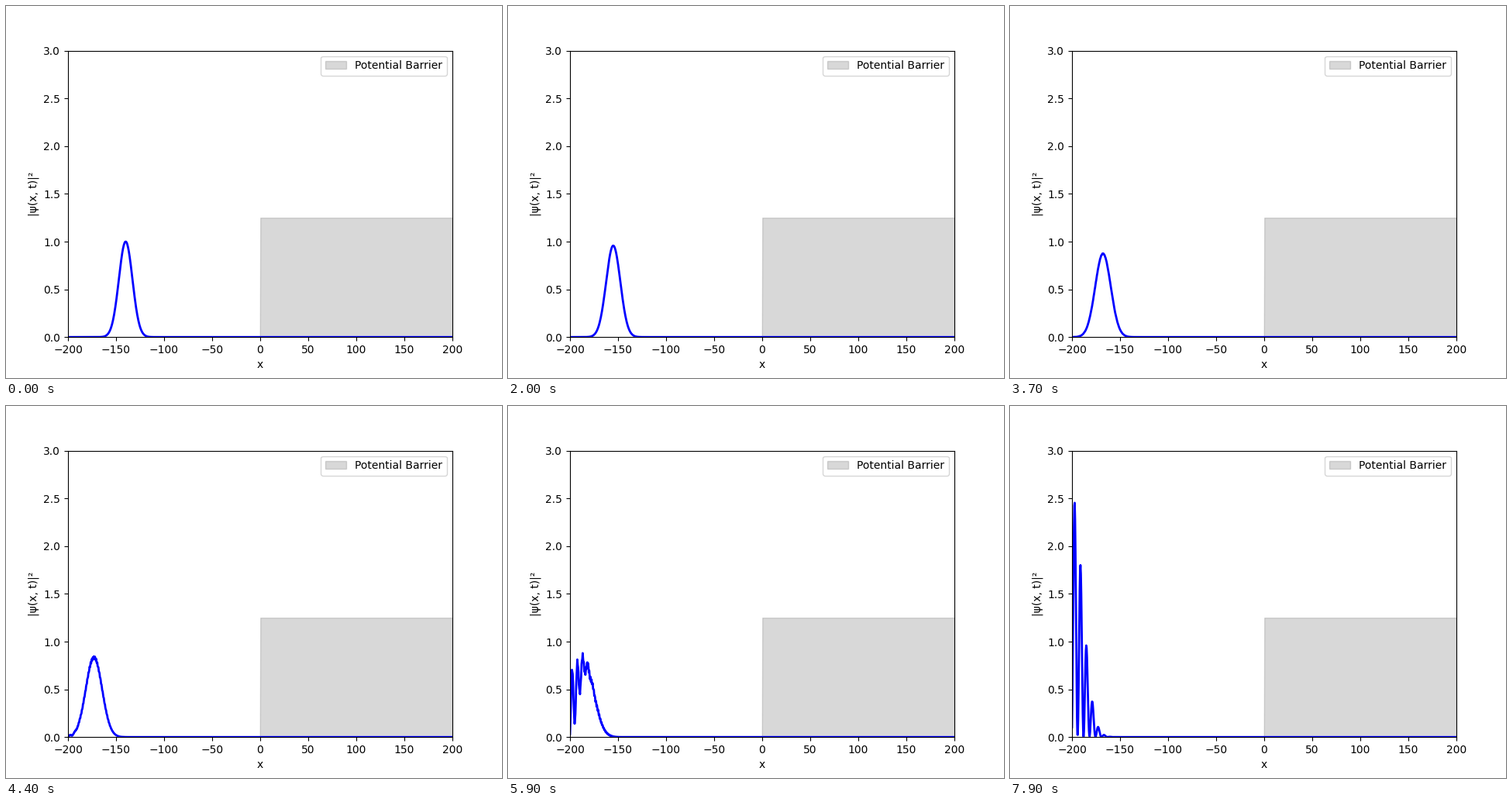
These frames come from a looping animation (640x480 px, 8000 ms). A matplotlib script:

```python
import numpy as np
import matplotlib.pyplot as plt
from matplotlib.animation import FuncAnimation

FRAMES, INTERVAL = 80, 100
DT = 1.5            # time units per frame
SIGMA, K = 10.0, 0.5
START, WALL = -140.0, -200.4
BARRIER = 1.25

x = np.linspace(-200, 200, 1000)
dist = x - WALL


def packet(d, t):
    """Spreading Gaussian packet that travels towards the wall."""
    spread = 1 + 1j * t / SIGMA**2
    u = d - (START - WALL - K * t)
    return np.exp(-u**2 / (2 * SIGMA**2 * spread) - 1j * K * d) / np.sqrt(spread)


def ripple(n):
    """Faint short-wave scatter while the packet meets the wall."""
    amp = 0.02 * np.exp(-((n - 54) / 11) ** 2)
    return amp * np.exp(-(dist / 55) ** 4 + 5j * dist)


def density(n):
    t = n * DT
    psi = packet(dist, t) - packet(-dist, t) + ripple(n)
    return np.abs(psi) ** 2


fig, ax = plt.subplots(figsize=(6.4, 4.8), dpi=100)
ax.set_xlim(-200, 200)
ax.set_ylim(0, 3)
ax.set_xlabel("x")
ax.set_ylabel("|ψ(x, t)|²")
ax.fill_between(x, 0, np.where(x > 0, BARRIER, 0), color="gray", alpha=0.3,
                label="Potential Barrier")
line, = ax.plot(x, density(0), color="blue", lw=2)
ax.legend(loc="upper right")


def update(n):
    line.set_ydata(density(n))
    return line,


anim = FuncAnimation(fig, update, frames=FRAMES, interval=INTERVAL,
                     repeat=True, repeat_delay=0)
plt.show()
```
